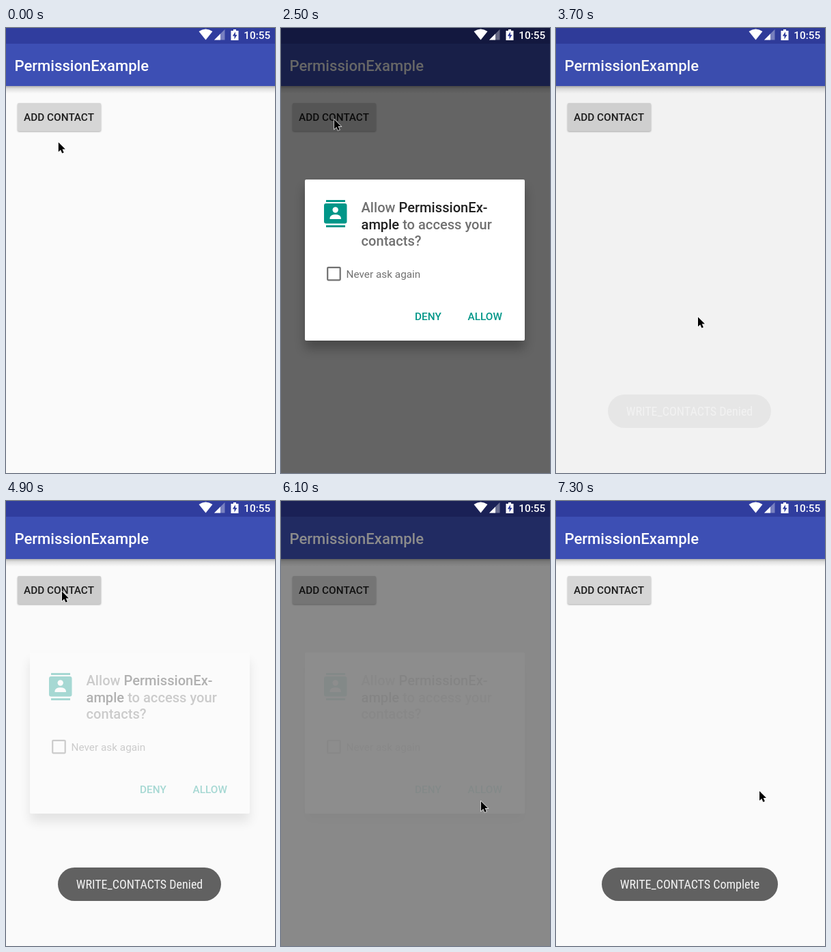
Write an HTML page that moves like this. It is 394 px wide and 652 px high and loops after 7400 ms.

```html
<!DOCTYPE html>
<html lang="en">
<head>
<meta charset="utf-8">
<title>Permission dialog</title>
<style>
  html, body { margin: 0; width: 100%; height: 100%; overflow: hidden; background: #fafafa; }
  svg { display: block; width: 394px; height: 652px; font: 500 15.35px Roboto, sans-serif; }
  .title { font-size: 22.1px; fill: #fff; }
  .message { font-size: 20.1px; fill: #717171; }
  .strong { fill: #212121; }
  .teal { fill: #009688; }
  .toast { font: 400 18px "Roboto Condensed", Roboto, sans-serif; font-stretch: condensed; fill: #f4f4f4; text-anchor: middle; }
</style>
</head>
<body>
<svg viewBox="0 0 394 652">
  <defs>
    <linearGradient id="barShade" x2="0" y2="1">
      <stop stop-opacity=".3"/>
      <stop offset=".35" stop-opacity=".11"/>
      <stop offset="1" stop-opacity="0"/>
    </linearGradient>
    <filter id="soft" x="-20%" y="-20%" width="140%" height="150%"><feGaussianBlur stdDeviation="8"/></filter>
    <filter id="slight" x="-10%" y="-20%" width="120%" height="150%"><feGaussianBlur stdDeviation="1"/></filter>
  </defs>

  <rect width="394" height="652" fill="#fafafa"/>
  <rect y="85" width="394" height="11" fill="url(#barShade)"/>
  <rect width="394" height="85" fill="#3d4fb4"/>
  <rect width="394" height="23" fill="#303d9e"/>
  <text class="title" x="12.5" y="63">PermissionExample</text>
  <rect x="17" y="111" width="122" height="41" rx="2" opacity=".32" filter="url(#slight)"/>
  <rect id="button" x="17" y="110" width="122" height="41" rx="2"/>
  <text x="26" y="136.3" fill="#1c1c1c">ADD CONTACT</text>

  <rect id="dim" width="394" height="652"/>

  <g fill="#fff">
    <path d="M292.500 17.500L282.500 5Q292.500 -2 302.500 5Z"/>
    <path d="M305 17.500L320.500 2V17.500Z" opacity=".35"/>
    <path d="M305 17.500L314 8.500V17.500Z"/>
    <path d="M333 2h4v2h3.500v14h-11v-14H333Z"/>
    <path d="M336 5.500L331.800 11.800H334.500V16.500L338.500 10H336Z" fill="#303d9e"/>
    <text x="348.300" y="15.500">10:55</text>
  </g>

  <g id="dialog">
    <rect x="35" y="234" width="322" height="236" rx="4" opacity=".27" filter="url(#soft)"/>
    <rect x="35" y="222" width="322" height="236" rx="2" fill="#fff"/>
    <path class="teal" d="M66 252h28v3H66ZM66 289h28v3H66Z"/>
    <rect class="teal" x="63" y="257" width="33.500" height="29.500" rx="3"/>
    <g fill="#fff">
      <circle cx="79.700" cy="266.500" r="4.200"/>
      <path d="M71.500 280v-2q1-4.500 8.200-4.700q7.200.2 8.200 4.700v2Z"/>
    </g>
    <g class="message">
      <text x="117.500" y="270.300">Allow <tspan class="strong">PermissionEx-</tspan></text>
      <text x="117.500" y="294.500"><tspan class="strong">ample</tspan> to access your</text>
      <text x="117.500" y="318.700">contacts?</text>
    </g>
    <rect x="68.200" y="350.800" width="18.500" height="18.500" rx="1" fill="none" stroke="#717171" stroke-width="2.200"/>
    <text x="95.500" y="366" font-weight="400" fill="#717171">Never ask again</text>
    <rect id="denyPress" x="187" y="404" width="59" height="39" rx="2" opacity=".05"/>
    <g class="teal">
      <text x="196" y="428.300">DENY</text>
      <text x="273.500" y="428.300">ALLOW</text>
    </g>
  </g>

  <g id="denied">
    <rect x="76" y="537" width="239" height="49" rx="24.500" fill="#616161"/>
    <text class="toast" x="195.500" y="568">WRITE_CONTACTS Denied</text>
  </g>
  <g id="complete">
    <rect x="67" y="537" width="258" height="49" rx="24.500" fill="#616161"/>
    <text class="toast" x="196" y="568">WRITE_CONTACTS Complete</text>
  </g>

  <path id="cursor" d="M0 0V14L3.200 11L5.400 16L7.900 15L5.700 10.100H10Z" stroke="#fff" stroke-width="1.300" paint-order="stroke"/>
</svg>
<script>
  const LOOP = 7400, STEP = 100;
  const $ = id => document.getElementById(id);
  const ramp = (t, start, length) => Math.min(1, Math.max(0, (t - start) / length));
  const smooth = u => u * u * (3 - 2 * u);
  const pulse = (t, inAt, inLength, outAt, outLength) =>
    smooth(ramp(t, inAt, inLength)) * (1 - smooth(ramp(t, outAt, outLength)));
  const within = (t, start, end) => t >= start && t < end;

  // Each move: start, end, x, y
  const home = [76.8, 167.5];
  const moves = [
    [350, 900, 78, 134],
    [2500, 3200, 208, 423.5],
    [4100, 4700, 82, 132.5],
    [5050, 5700, 293, 440],
    [6600, 7200, 298, 425],
  ];
  // Opening and closing times of the dialog
  const visits = [[2150, 3420], [4850, 5955]];

  function cursorAt(t) {
    let [x, y] = home;
    for (const [start, end, toX, toY] of moves) {
      const u = smooth(ramp(t, start, end - start));
      x += (toX - x) * u;
      y += (toY - y) * u;
    }
    return [x, y];
  }

  const fade = (id, value) => $(id).setAttribute("opacity", value);

  function draw(now) {
    const t = Math.floor((now % LOOP) / STEP) * STEP;
    let dialog = 0, dim = 0;
    for (const [open, close] of visits) {
      dialog += ramp(t, open, 150) * (1 - ramp(t, close, 150));
      dim += pulse(t, open + 50, 250, close + 65, 250);
    }
    fade("dialog", dialog);
    fade("dim", dim * 0.6);
    fade("denied", pulse(t, 3650, 300, 5600, 300));
    fade("complete", pulse(t, 6170, 300, LOOP, 1));
    fade("denyPress", within(t, 3400, 3600) ? 0.05 : 0);
    const pressed = within(t, 2000, 2300) || within(t, 4800, 5100);
    $("button").setAttribute("fill", pressed ? "#ccc" : "#d6d6d6");
    $("cursor").setAttribute("transform", `translate(${cursorAt(t)})`);
    requestAnimationFrame(draw);
  }

  // Smaller type where no condensed face is installed
  const labels = document.querySelectorAll(".toast");
  if (labels[0].getComputedTextLength() > 195) labels.forEach(label => label.style.fontSize = "16px");

  requestAnimationFrame(draw);
</script>
</body>
</html>
```
